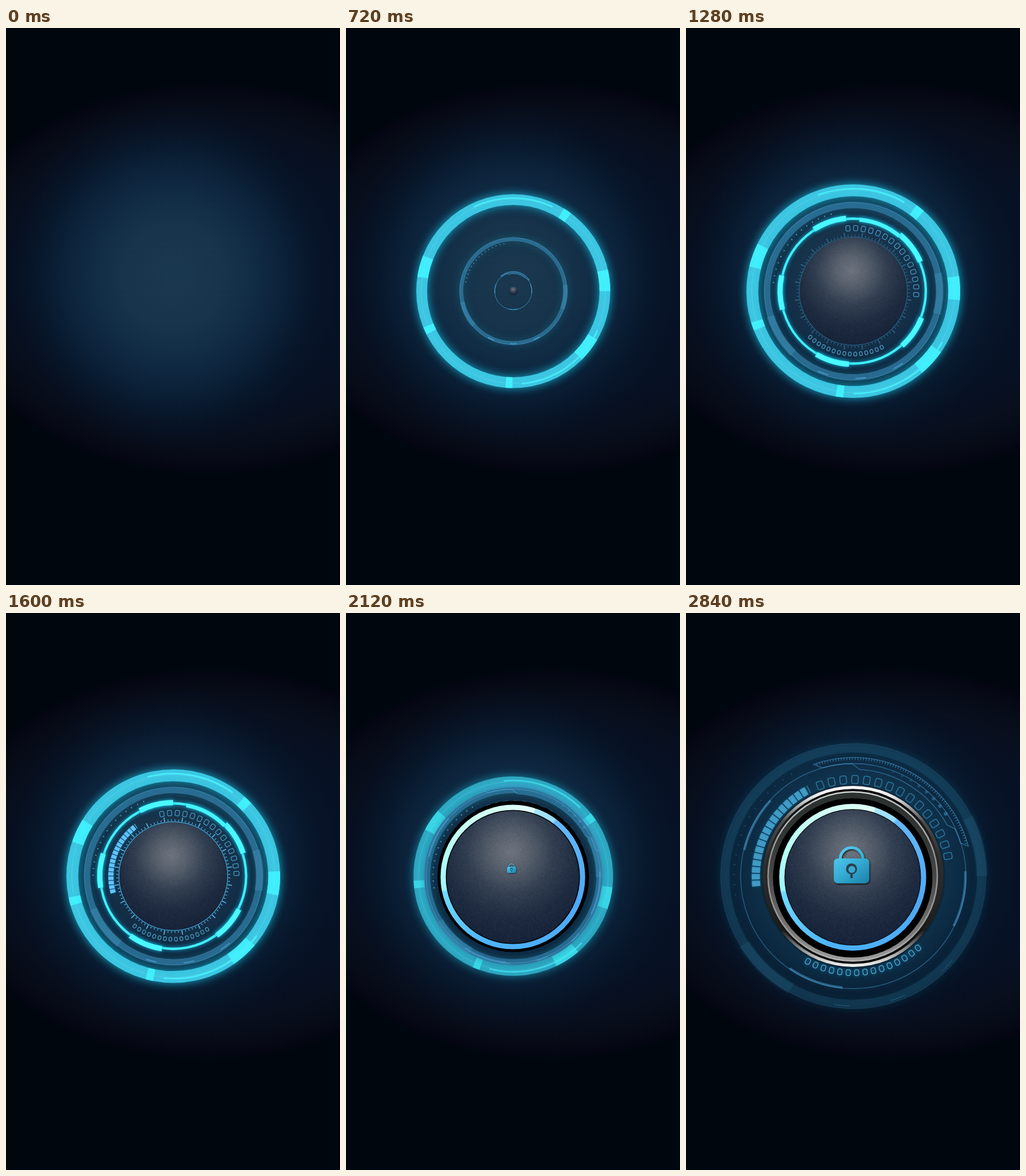
Write an HTML page with a canvas that moves like this. It is 575x960 px and loops after 3800 ms.

```html
<!DOCTYPE html>
<html lang="en">
<head>
<meta charset="utf-8">
<title>Lock dial</title>
<style>
html, body { margin: 0; width: 100%; height: 100%; overflow: hidden; background: #00060e; }
canvas { display: block; width: 575px; height: 960px; }
</style>
</head>
<body>
<canvas id="stage" width="575" height="960"></canvas>
<script>
const W = 575, H = 960, LOOP = 3800, STEP = 40;
const CX = 288, CY = 453.5, RAD = Math.PI / 180;
const ctx = document.getElementById('stage').getContext('2d');

const clamp = (v, a = 0, b = 1) => Math.min(b, Math.max(a, v));
const span = (t, a, b) => clamp((t - a) / (b - a));
const easeOut = u => 1 - (1 - u) * (1 - u);

// Piecewise linear value from [time, value] pairs.
function track(t, keys) {
  if (t <= keys[0][0]) return keys[0][1];
  for (let i = 1; i < keys.length; i++) {
    const [t0, v0] = keys[i - 1], [t1, v1] = keys[i];
    if (t <= t1) return v0 + (v1 - v0) * (t - t0) / (t1 - t0);
  }
  return keys[keys.length - 1][1];
}

function layer(w, h, paint) {
  const c = document.createElement('canvas');
  c.width = w; c.height = h;
  paint(c.getContext('2d'));
  return c;
}

function fade(grad, stops) {
  for (const [at, color] of stops) grad.addColorStop(at, color);
  return grad;
}

const backdrop = layer(W, H, g => {
  const oval = (x, y, rx, ry, stops) => {
    g.save();
    g.translate(x, y);
    g.scale(rx, ry);
    g.fillStyle = fade(g.createRadialGradient(0, 0, 0, 0, 0, 1), stops);
    g.fillRect(-3, -3, 6, 6);
    g.restore();
  };
  g.fillStyle = '#00060e';
  g.fillRect(0, 0, W, H);
  oval(350, 432, 470, 342, [[0, '#08142a'], [0.6, '#071226'], [0.78, '#080f1e'],
    [0.9, '#070b16'], [0.96, '#050613'], [1, 'rgba(0,6,14,0)']]);
  oval(288, 428, 295, 300, [[0, '#1b3b52'], [0.3, '#18364e'], [0.5, '#112c46'],
    [0.66, 'rgba(12,36,60,.9)'], [0.82, 'rgba(8,26,46,.6)'], [1, 'rgba(6,18,36,0)']]);
  g.fillStyle = 'rgba(0,8,20,.16)';
  for (let y = 0; y < H; y += 3) g.fillRect(0, y, W, 1);
});

const BALL = 240;
const ball = layer(BALL, BALL, g => {
  const r = BALL / 2;
  g.fillStyle = fade(g.createRadialGradient(r - 4, r * 0.62, 0, r - 4, r * 0.62, r * 1.45), [
    [0, '#6d747e'], [0.18, '#5a626e'], [0.45, '#323f51'], [0.7, '#1e2b40'], [1, '#152136']]);
  g.beginPath();
  g.arc(r, r, r - 1, 0, 7);
  g.fill();
  const img = g.getImageData(0, 0, BALL, BALL), px = img.data;
  let seed = 7;
  for (let i = 0; i < px.length; i += 4) {
    seed = (seed * 16807) % 2147483647;
    const n = (seed / 2147483647 - 0.5) * 14;
    for (let k = 0; k < 3; k++) px[i + k] += n;
  }
  g.putImageData(img, 0, 0);
});

function arc(r, a, b, width, color) {
  if (r <= 0) return;
  ctx.beginPath();
  ctx.arc(0, 0, r, a * RAD, b * RAD);
  ctx.lineWidth = width;
  ctx.strokeStyle = color;
  ctx.stroke();
}
const ring = (r, width, color) => arc(r, 0, 360, width, color);

function disc(x, y, r, fill) {
  if (r <= 0) return;
  ctx.beginPath();
  ctx.arc(x, y, r, 0, 7);
  ctx.fillStyle = fill;
  ctx.fill();
}

function glow(color, blur) {
  ctx.shadowColor = color;
  ctx.shadowBlur = blur;
}

function tick(r0, r1, a, width, color) {
  const c = Math.cos(a * RAD), s = Math.sin(a * RAD);
  ctx.beginPath();
  ctx.moveTo(c * r0, s * r0);
  ctx.lineTo(c * r1, s * r1);
  ctx.lineWidth = width;
  ctx.strokeStyle = color;
  ctx.stroke();
}

function group(alpha, angle, draw) {
  if (alpha <= 0) return;
  ctx.save();
  ctx.globalAlpha = alpha;
  ctx.rotate(angle * RAD);
  draw();
  ctx.restore();
}

// Wide bright ring
function outerRing(r) {
  const w = r * 0.111, mid = r - w / 2, lit = 'rgba(66,246,255,.85)';
  glow('#16a9c8', 16);
  ring(mid, w, '#3cc6e2');
  glow('transparent', 0);
  ring(r * 0.95, 0.8, 'rgba(110,225,245,.5)');
  for (const [a, b] of [[-13, 0], [30, 45], [90.5, 94.7], [153.5, 158], [188.5, 201.5], [301.5, 306.5]])
    arc(mid, a, b, w, lit);
  arc(r * 0.96, 245, 295, r * 0.013, '#46f0fb');
  arc(r * 0.96, 25, 85, r * 0.013, '#46f0fb');
}

// Dim blue ring with dots and glints
function innerRing(r) {
  const w = r * 0.068, mid = r - w / 2;
  glow('rgba(20,130,155,.75)', 14);
  ring(mid, w, 'rgba(50,122,164,.85)');
  glow('transparent', 0);
  ring(r - 1, 1, 'rgba(80,155,195,.45)');
  ring(r - w, 1, 'rgba(80,155,195,.35)');
  for (const [a, b] of [[-7, 20], [139, 168]]) arc(mid, a, b, w * 1.3, 'rgba(62,142,180,.5)');
  for (const a of [64, 90, 115]) arc(r * 0.978, a - 3.5, a + 3.5, 1.3, '#4fb2e2');
  for (let i = 0; i < 15; i++)
    tick(r * 0.889, r * 0.904, 191 + i * 4.84, 1.5, '#62bede');
}

function gear(r) {
  glow('#12b6dc', 7);
  ring(r * 0.975, r * 0.032, '#40eefa');
  for (let i = 0; i < 5; i++) {
    const c = 30 + i * 72;
    arc(r * 0.985, c - 13.5, c + 13.5, r * 0.07, '#4af8ff');
  }
  arc(r * 0.965, 270, 305, r * 0.052, '#46f4fd');
  glow('transparent', 0);
}

// Thin ring with three arcs and the notched plate; drawn at radius 194 and scaled
function plate(r, color) {
  const k = r / 194;
  if (k <= 0) return;
  const line = 1 / Math.max(k, 0.4);
  const to = (rad, a) => ctx.lineTo(rad * Math.cos(a * RAD), rad * Math.sin(a * RAD));
  ctx.scale(k, k);
  ring(194, 1.3 * line, color);
  for (const a of [12, 110, 208]) arc(193, a - 14.5, a + 14.5, 4.2, color);
  ctx.beginPath();
  ctx.arc(0, 0, 204.5, 250.4 * RAD, 345.5 * RAD);
  to(196, 343.5);
  ctx.arc(0, 0, 193, 343 * RAD, 335 * RAD, true);
  ctx.arc(0, 0, 184, 331.5 * RAD, 273.5 * RAD, true);
  ctx.arc(0, 0, 194, 269.3 * RAD, 254 * RAD, true);
  ctx.closePath();
  ctx.lineWidth = 1.5 * line;
  ctx.strokeStyle = color;
  ctx.stroke();
  for (let a = 252; a < 345; a += 1.35) tick(200, 204.5, a, 1.5, color);
  const base = ctx.globalAlpha;
  for (let i = 0; i < 9; i++) {
    const a = (286 + i * 5) * RAD;
    ctx.globalAlpha = base * (0.15 + i * 0.1);
    disc(192 * Math.cos(a), 192 * Math.sin(a), 2 + i * 0.16, color);
  }
}

function bars(r, color) {
  const mid = r * 0.959, w = r * 0.082;
  for (let i = 0; i < 17; i++) arc(mid, 154 + i * 4, 157.35 + i * 4, w, color);
  tick(r * 0.92, r, 222.8, 1, color);
}

function boxes(r, start, step, w, h, color) {
  if (r < 20) return;
  const k = r / 166.5;
  ctx.strokeStyle = color;
  ctx.lineWidth = 0.8 + 0.7 * k;
  for (let i = 0; i < 15; i++) {
    ctx.save();
    ctx.rotate((start + i * step + 90) * RAD);
    ctx.beginPath();
    ctx.roundRect(-w * k / 2, -r - h * k / 2, w * k, h * k, 3 * k);
    ctx.stroke();
    ctx.restore();
  }
}

function dialTicks(r) {
  ring(r, 1.2, '#4bb6ee');
  for (let i = 0; i < 100; i++) {
    const long = i % 5 === 0;
    tick(r + 1, r + (long ? 8.5 : 4.5), 9 + i * 3.6, long ? 1.6 : 1.1, '#58bdea');
  }
}

function metal(r) {
  const up = (rad, stops) => fade(ctx.createLinearGradient(0, -rad, 0, rad), stops);
  glow('rgba(0,0,0,.7)', 5);
  disc(-0.5, 0.5, r, up(r, [[0, '#ffffff'], [0.06, '#e6e6e6'], [0.2, '#4a4a4a'], [0.4, '#303030'],
    [0.8, '#1c1c1c'], [0.93, '#aaaaaa'], [1, '#f4f4f4']]));
  glow('transparent', 0);
  disc(-0.5, 0.5, r * 0.967, up(r, [[0, '#000'], [0.35, '#2a2a2a'], [0.65, '#262626'], [1, '#000']]));
  disc(-1, 0.5, r * 0.942, up(r, [[0, '#d0d8d4'], [0.4, '#909090'], [0.8, '#9c9c9c'], [1, '#b8b8b8']]));
  disc(-1, 0.5, r * 0.926, up(r, [[0, '#28302e'], [0.3, '#343636'], [0.5, '#484848'], [0.8, '#777'], [1, '#a4a4a4']]));
  disc(-1, 3, r * 0.88, '#000');
}

function colorRing(r) {
  const grad = fade(ctx.createConicGradient(-72 * RAD, 0, 0), [
    [0, '#a8e6fb'], [0.05, '#98dcfb'], [0.055, '#64b8f8'], [0.25, '#4fa8f5'], [0.5, '#4cb2fb'],
    [0.665, '#70daff'], [0.672, '#9ff6ff'], [0.76, '#b6fff4'], [0.88, '#d0fff4'], [1, '#e0fff9']]);
  ring(r - 4.5, 9, grad);
}

function padlock(k) {
  ctx.save();
  ctx.translate(285, 435 + 7 * (1 - k));
  ctx.scale(k, k);
  const blue = fade(ctx.createLinearGradient(-22, -30, 24, 32), [[0, '#58cdf0'], [0.5, '#36aed6'], [1, '#1c83ac']]);
  glow('rgba(0,0,0,.65)', 3);
  ctx.shadowOffsetX = 1.5 * k;
  ctx.shadowOffsetY = 2 * k;
  ctx.beginPath();
  ctx.moveTo(-19.5, -9);
  ctx.arc(0, -11, 19.5, Math.PI, 0);
  ctx.lineTo(19.5, -9);
  ctx.lineWidth = 5;
  ctx.strokeStyle = blue;
  ctx.stroke();
  ctx.beginPath();
  ctx.roundRect(-30.5, -12, 61, 43, 7);
  ctx.fillStyle = blue;
  ctx.fill();
  glow('transparent', 0);
  disc(0, 6, 9.5, '#2c3f4c');
  ctx.fillRect(-2, 14, 4, 8);
  disc(0.5, 7, 6, '#38a9d0');
  ctx.restore();
}

function draw(t) {
  ctx.drawImage(backdrop, 0, 0);
  if (t < 160) return;
  const rot = clamp((t - 1000) * 0.0173, 0, 20);

  ctx.save();
  ctx.translate(CX, CY);

  const haze = track(t, [[2160, 0], [2400, 1], [2840, 0.75]]);
  group(haze, 0, () => disc(0, 0, 245, fade(ctx.createRadialGradient(0, 0, 140, 0, 0, 245),
    [[0, 'rgba(16,84,112,.34)'], [0.5, 'rgba(14,78,106,.24)'], [1, 'rgba(10,60,90,0)']])));

  const shrink = span(t, 2000, 2400);
  const wide = 184 * easeOut(span(t, 120, 982)) * (1 - 0.22 * shrink);
  group(1 - shrink, rot, () => outerRing(wide));

  const blue = t < 2160 ? 154 * easeOut(span(t, 504, 1087))
    : track(t, [[2160, 154], [2400, 191], [2600, 216], [2800, 229]]);
  const blueAlpha = track(t, [[1900, 0.85], [2120, 0.8], [2400, 0.42], [2800, 0.24]]);
  if (blue > 0) group(blueAlpha, -rot, () => innerRing(blue));

  const thin = track(t, [[506, 0], [1040, 80], [1240, 86], [1800, 86], [2340, 194]]);
  if (thin > 0) group(track(t, [[1240, 1], [1800, 0.7], [2360, 0.5]]), rot - 20,
    () => plate(thin, t < 1800 ? '#4fb9f2' : '#4a9dd0'));

  const cog = track(t, [[720, 7], [1040, 110], [1240, 128], [1840, 129]]);
  if (t >= 720) group(1 - span(t, 1840, 2040), rot, () => gear(cog));

  const cell = track(t, [[720, 5], [1040, 101], [1240, 108.5], [1840, 109], [2400, 140], [2680, 166.5]]);
  if (t >= 720) {
    const late = t > 2000;
    group(0.8, -rot, () => boxes(cell, 270, 7, 11, 14, late ? '#3288b4' : '#51b1e4'));
    group(0.85, -rot, () => {
      if (late) glow('#1483ae', 6);
      boxes(cell, 68, 5, 7.5, 10, '#54b3d8');
    });
  }

  if (t >= 1240) {
    const bar = track(t, [[1240, 85], [1480, 112], [1840, 112], [2120, 126], [2360, 175]]);
    group(track(t, [[1840, 1], [2360, 0.8]]), rot, () => {
      glow('rgba(20,130,190,.6)', 5);
      bars(bar, t < 2000 ? '#62c6fa' : '#4eaed8');
    });
  }

  const dial = track(t, [[680, 0], [720, 8], [1040, 78.5], [1240, 93], [1840, 94], [2120, 115], [2360, 117.5]]);
  group(span(t, 1200, 1400) * (1 - span(t, 1840, 1960)), 0, () => dialTicks(dial));

  const rim = track(t, [[2120, 124], [2360, 156]]);
  if (rim > 130) metal(rim);
  if (t >= 1840) disc(0, 0.5, track(t, [[1840, 94], [2080, 130], [2360, 133]]), '#000');
  const drop = track(t, [[1840, 0], [2120, 1.5], [2400, 2]]);
  ctx.translate(-drop / 2, drop);
  if (t >= 1840) colorRing(track(t, [[1840, 102], [2120, 124.5], [2360, 126.5]]));
  if (dial > 0) ctx.drawImage(ball, -dial, -dial, dial * 2, dial * 2);
  ctx.restore();

  if (t > 2020) padlock(span(t, 2020, 2412));
}

const start = performance.now();
function frame() {
  const t = (performance.now() - start) % LOOP;
  draw(Math.floor(t / STEP) * STEP);
  requestAnimationFrame(frame);
}
frame();
</script>
</body>
</html>
```
